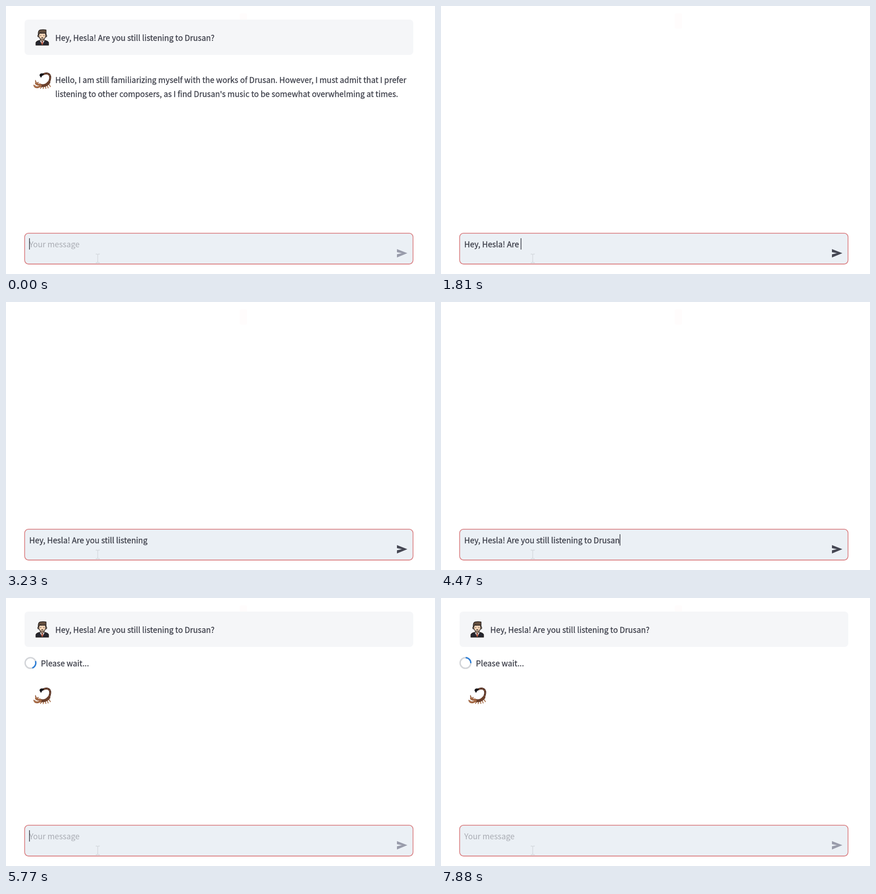
An HTML page that plays this animation: 947x592 px, repeating every 8 s.

```html
<!DOCTYPE html>
<html lang="en">
<head>
<meta charset="utf-8">
<style>
html, body { margin: 0; height: 100%; overflow: hidden; background: #fff; }
svg { display: block; }
text {
  font: 17.4px "Noto Sans CJK SC", "Noto Sans CJK JP", "Noto Sans", sans-serif;
  fill: #3a3c47; stroke: #3a3c47; stroke-width: .3; white-space: pre;
}
.hint { fill: #a9acb3; stroke: none; }
</style>
</head>
<body>
<svg width="947" height="592" viewBox="0 0 947 592">
  <defs>
    <path id="send" d="M863 537 L886 546 L863 555.5 V548.5 L874 546 L863 543.8 Z"/>

    <g id="question">
      <rect x="41" y="30" width="858" height="78" rx="8" fill="#f5f6f8"/>
      <g stroke="#2b2523" stroke-width="1.400" stroke-linejoin="round">
        <path d="M66 86.500 V81 Q67 77.500 75 75.500 H85 Q93 77.500 94 81 V86.500 Z" fill="#25262f"/>
        <path d="M74 75.500 L80 86 L86 75.500 Z" fill="#f4eeee" stroke-width=".6"/>
        <path d="M79 77 H81 L82 84 L80 86 L78 84 Z" fill="#b4543c" stroke="none"/>
        <path d="M76 71 V75.500 L80 78 L84 75.500 V71 Z" fill="#e0b595"/>
        <ellipse cx="71.500" cy="66" rx="1.400" ry="2.300" fill="#ecc7a8"/>
        <ellipse cx="88.500" cy="66" rx="1.400" ry="2.300" fill="#ecc7a8"/>
        <path d="M72.500 60 H87.500 V67 Q86.500 73 80 74 Q73.500 73 72.500 67 Z" fill="#f2d2b4"/>
        <path d="M71.500 64 Q70 55 75 53 Q82 51.500 88.500 53 V64 L86.500 59.500 Q79 61 75 59 Z" fill="#66503f"/>
        <path d="M76.500 64.500 V66 M83.500 64.500 V66 M78 70 Q80 71 82 70" fill="none"/>
      </g>
      <text x="108.800" y="76.500">Hey, Hesla! Are you still listening to Drusan?</text>
    </g>

    <g id="scorpion" fill="none" stroke-linecap="round">
      <path d="M83 178 l-1 4.500 M87 177 l1 5 M91 175 l2 6 M94 172 l4 6 M79 178 l-3 4" stroke="#a0643c" stroke-width="1.800"/>
      <path d="M94 170 Q100 158 96 152 Q91 147 83 150.500" stroke="#56352a" stroke-width="4.500"/>
      <path d="M76 175.500 Q87 178 94.500 169" stroke="#6b402c" stroke-width="6.500"/>
      <path d="M96 166 Q99.500 157 95.500 152 Q91 148.500 85 150" stroke="#8c5a3e" stroke-width="1.800" stroke-dasharray="2 4"/>
      <path d="M83 149 Q74 147.500 74 153.500 L77.500 159 Q78 155 83 152.500 Z" fill="#18161a"/>
      <path d="M77 176 Q70 181 65 179 M75 173 Q69 175 66 171" stroke="#a66b47" stroke-width="4"/>
      <path d="M61 174.500 Q61 181.500 70 180.500 L66 177 Z M65 164 Q63.500 171 70 174.500 L71.500 168 L68 170 Z" fill="#b87a52" stroke="#8d5637"/>
    </g>
  </defs>

  <rect x="516" y="16" width="16" height="34" rx="4" fill="#fffcfc"/>
  <rect x="41.200" y="501.800" width="857.300" height="68.200" rx="8.500" fill="#ebf0f5" stroke="#db8487" stroke-width="1.800"/>
  <path d="M198 548 H201 L202.500 549.500 L204 548 H207 M202.500 549.500 V565.500 M198 567 H201 L202.500 565.500 L204 567 H207" fill="none" stroke="#d3d7dc" stroke-width="1.300"/>

  <g id="ask"><use href="#question"/></g>
  <g id="reply">
    <use href="#scorpion"/>
    <text x="108.800" y="170">Hello, I am still familiarizing myself with the works of Drusan. However, I must admit that I prefer</text>
    <text x="108.800" y="200.500">listening to other composers, as I find Drusan's music to be somewhat overwhelming at times.</text>
  </g>
  <g id="wait">
    <circle cx="54" cy="143.500" r="11.800" fill="none" stroke="#d3d5d9" stroke-width="3"/>
    <path id="arc" d="M62.340 135.160 A11.800 11.800 0 0 1 62.340 151.840" fill="none" stroke="#2f7fd6" stroke-width="3"/>
    <text x="77" y="150.500">Please wait...</text>
    <use href="#scorpion" y="51"/>
  </g>
  <g id="idle">
    <text class="hint" x="51.300" y="532.500">Your message</text>
    <use href="#send" fill="#999cab"/>
  </g>
  <g id="draft">
    <text id="typed" x="51.300" y="532.500"></text>
    <use href="#send" fill="#464854"/>
  </g>
  <rect id="caret" y="513" width="1.500" height="25" fill="#33353f"/>
</svg>
<script>
const LOOP = 8000, FADE_FROM = 30, FADE_TO = 350, SENT = 4890, SHOWN = 5190;
const message = "Hey, Hesla! Are you still listening to Drusan";
// One key time for each character of the message
const keys = [
  70, 150, 230, 330, 490,
  600, 700, 790, 890, 1010, 1150, 1290,
  1430, 1670, 1730, 1810,
  1900, 1980, 2060, 2130,
  2190, 2240, 2280, 2320, 2360, 2390,
  2510, 2610, 2710, 2810, 2950, 3010, 3080, 3150, 3220, 3350,
  3350, 3390, 3390,
  3770, 3850, 3950, 4090, 4230, 4350
];
const caretGaps = [[3200, 3350], [3530, 3770], [4630, SENT]];
const el = id => document.getElementById(id);
const fade = (id, a) => el(id).setAttribute("opacity", a);

function caretOn(t) {
  if (t >= SENT) return Math.floor((t - 5870) / 463) % 2 !== 0;
  return !caretGaps.some(([from, to]) => t >= from && t < to);
}

function draw(t) {
  const old = t < FADE_FROM ? 1 : Math.max(0, 1 - t / FADE_TO);
  const sent = t >= SENT, shown = t >= SHOWN;
  fade("ask", shown ? 1 : old);
  fade("reply", old);
  fade("wait", shown ? 1 : 0);
  fade("idle", sent ? 1 : old);
  fade("draft", sent ? 0 : 1 - old);

  const count = sent ? 0 : keys.filter(k => k <= t).length;
  el("typed").textContent = message.slice(0, count);
  const width = count ? el("typed").getComputedTextLength() : 0;
  el("caret").setAttribute("x", 51 + width);
  fade("caret", caretOn(t) ? 1 : 0);

  const angle = 24 + (t - 5770) / 750 * 360;
  el("arc").setAttribute("transform", `rotate(${angle} 54 143.5)`);
}

function tick() {
  draw(performance.now() % LOOP);
  requestAnimationFrame(tick);
}
tick();
</script>
</body>
</html>
```
